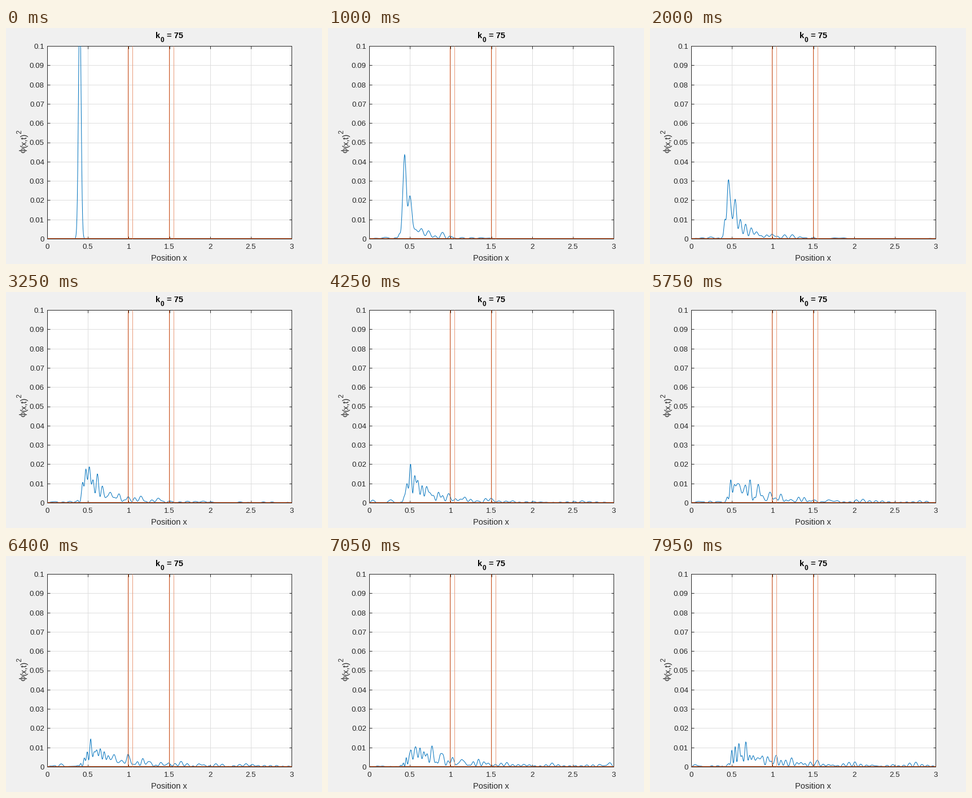
Recreate the animation shown at these times as a matplotlib script. Size 560 by 420 pixels, loop 8 s.

```python
import numpy as np
import matplotlib.pyplot as plt
from matplotlib.animation import FuncAnimation

W, H, DPI = 560, 420, 100
FRAMES, INTERVAL = 160, 50
PX = 72 / DPI                      # one pixel in points
BLUE, ORANGE, PALE, INK = "#0072BD", "#D95319", "#E89B79", "#262626"
SANS = "Liberation Sans"

# Wave packet in a box with two narrow potential steps
K0, X0, SPREAD = 75, 0.4, 0.001
DX, DT, V0 = 0.005, 0.01, 500
x = np.arange(0, 3 + DX / 2, DX)


def potential(x):
    first = (x > 1 - DX / 2) & (x < 1.05 - DX / 2)
    second = (x > 1.5 - DX / 2) & (x < 1.55 - DX / 2)
    return V0 * (first | second)


def evolve():
    """Densities of all frames by Crank-Nicolson steps."""
    n = len(x) - 2
    hop = -0.5 / DX**2
    ham = np.diag(1 / DX**2 + potential(x[1:-1]))
    ham = ham + hop * (np.eye(n, k=1) + np.eye(n, k=-1))
    half = 0.5j * DT * ham
    step = np.linalg.solve(np.eye(n) + half, np.eye(n) - half)
    psi = np.exp(-(x - X0) ** 2 / SPREAD + 1j * K0 * x)[1:-1]
    psi /= np.linalg.norm(psi)
    out = np.zeros((FRAMES, len(x)))
    for row in out:
        row[1:-1] = np.abs(psi) ** 2
        psi = step @ psi
    return out


density = evolve()

fig = plt.figure(figsize=(W / DPI, H / DPI), dpi=DPI, facecolor="#F0F0F0")
L, R, T, B = 73, 506, 32, 375
ax = fig.add_axes([L / W, 1 - B / H, (R - L) / W, (B - T) / H])
ax.set(xlim=(0, 3), ylim=(0, 0.1), facecolor="white")
ax.set_xticks(np.arange(0, 3.1, 0.5))
ax.set_yticks(np.arange(0, 0.101, 0.01))
ax.tick_params(direction="in", top=True, right=True, length=4.5 * PX,
               width=PX, color=INK, labelbottom=False, labelleft=False)
ax.grid(color="#DEDEDE", lw=PX)
ax.set_axisbelow(True)
for spine in ax.spines.values():
    spine.set(linewidth=PX, color=INK, zorder=1.5)


def label(px, py, text, size, **kw):
    kw = {"color": INK, "family": SANS, "va": "baseline", **kw}
    fig.text(px / W, 1 - py / H, text, fontsize=size * PX, **kw)


for v in ax.get_xticks():
    label(L + v / 3 * (R - L), 393, f"{v:g}", 13.33, ha="center")
for v in ax.get_yticks():
    label(68, B - v / 0.1 * (B - T) + 5, f"{v:g}", 13.33, ha="right")

label(289, 414, "Position x", 14.67, ha="center")
label(265, 18, "k", 14.67, weight="bold", color="black")
label(274, 25, "0", 11.7, weight="bold", color="black")
label(285, 18, "= 75", 14.67, weight="bold", color="black")
side = dict(rotation=90, ha="right", va="bottom")
label(37, 222, "\u03d5", 13.5, **{**side, "family": "DejaVu Serif"})
label(39, 213, "(x,t)", 14.67, **side)
label(30, 188, "2", 11.7, **side)


def stroke(xs, ys, color):
    px = [a / W for a in xs]
    py = [1 - b / H for b in ys]
    fig.add_artist(plt.Line2D(px, py, lw=PX, color=color, snap=True,
                              solid_capstyle="butt"))


curve, = ax.plot(x, density[0], color=BLUE, lw=PX, zorder=3)
for left, right in ((216, 224), (289, 297)):
    stroke((left, left), (T, B), ORANGE)
    stroke((right, right), (T, B), PALE)
stroke((L, R), (B - 1, B - 1), ORANGE)


def draw(i):
    curve.set_ydata(density[i])
    return curve,


anim = FuncAnimation(fig, draw, frames=FRAMES, interval=INTERVAL,
                     repeat=True, repeat_delay=0)
plt.show()
```
